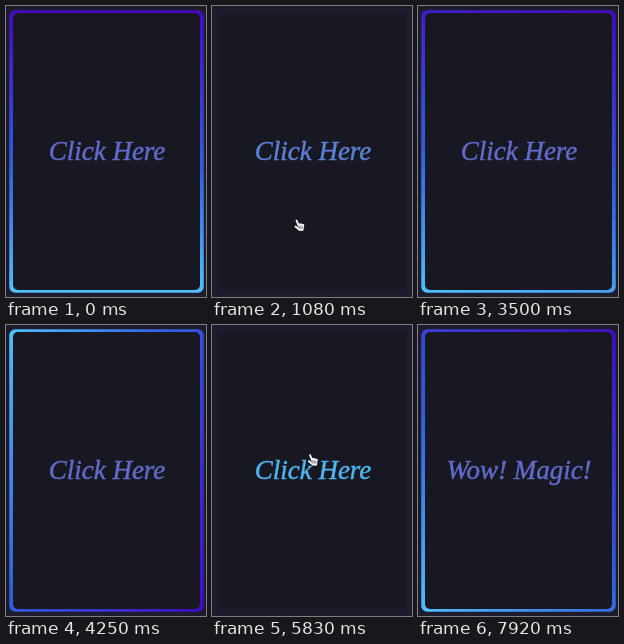
Recreate the animation shown at these times as an HTML page with a canvas. Size 200 by 291 pixels, loop 8000 ms.

```html
<!DOCTYPE html>
<html lang="en">
<head>
<meta charset="utf-8">
<title>Magic card</title>
<style>
  html, body { margin: 0; width: 100%; height: 100%; overflow: hidden; background: #1d1c2d; }
  canvas { display: block; width: 200px; height: 291px; }
</style>
</head>
<body>
<canvas id="stage"></canvas>
<script>
const W = 200, H = 291, LOOP = 8000, STEP = 1000 / 12, SPIN = 2500, SWAP = 6160;
const IDLE = [97, 107, 202], LIT = [79, 181, 242];
const canvas = document.getElementById('stage');
const ctx = canvas.getContext('2d');
const ratio = window.devicePixelRatio || 1;
canvas.width = W * ratio;
canvas.height = H * ratio;

const CARD = { x: 7, y: 7, w: 187, h: 277, r: 5 };
// The rim is 104% by 102% of the card
const RIM = { x: CARD.x - CARD.w * 0.02, y: CARD.y - CARD.h * 0.01, w: CARD.w * 1.04, h: CARD.h * 1.02, r: 6 };

const key = (t, x, y) => ({ t, x, y });
const visit = (...keys) => ({ keys, from: keys[0].t, to: keys[keys.length - 1].t });

// Times when the pointer is over the card
const VISITS = [
  visit(key(890, 93, 284), key(1083, 82, 213), key(1900, 18, 165), key(2333, 71, 79),
    key(2700, 140, 118), key(3020, 46, 150), key(3410, 200, 142)),
  visit(key(4490, 100, 284), key(5000, 92.5, 174), key(6080, 96, 125), key(6580, 92, 158),
    key(6950, 32, 184), key(7630, 198, 142))
];

function box({ x, y, w, h, r }, fill) {
  ctx.beginPath();
  ctx.roundRect(x, y, w, h, r);
  ctx.fillStyle = fill;
  ctx.fill();
}

function rimGradient(angle) {
  const s = Math.sin(angle), c = Math.cos(angle);
  const half = (Math.abs(RIM.w * s) + Math.abs(RIM.h * c)) / 2;
  const cx = RIM.x + RIM.w / 2, cy = RIM.y + RIM.h / 2;
  const g = ctx.createLinearGradient(cx - s * half, cy + c * half, cx + s * half, cy - c * half);
  g.addColorStop(0, '#50c0ff');
  g.addColorStop(0.43, '#3260e2');
  g.addColorStop(1, '#440ac0');
  return g;
}

// CSS "ease", solved by bisection
function ease(x) {
  let lo = 0, hi = 1;
  for (let i = 0; i < 20; i++) {
    const u = (lo + hi) / 2;
    if (0.75 * u * (1 - u) + u ** 3 < x) lo = u; else hi = u;
  }
  return 0.3 * lo * (1 - lo) ** 2 + 3 * lo * lo * (1 - lo) + lo ** 3;
}

// Smooth curve through the keys of a visit
function along(keys, t) {
  const i = keys.findLastIndex(k => k.t <= t);
  const a = keys[i], b = keys[i + 1], span = b.t - a.t, u = (t - a.t) / span;
  const slope = (j, axis) => {
    const p = keys[Math.max(j - 1, 0)], q = keys[Math.min(j + 1, keys.length - 1)];
    return (q[axis] - p[axis]) / (q.t - p.t) * span;
  };
  return ['x', 'y'].map(axis =>
    a[axis] + (b[axis] - a[axis]) * u * u * (3 - 2 * u) +
    slope(i, axis) * u * (1 - u) ** 2 + slope(i + 1, axis) * u * u * (u - 1));
}

function line(x1, y1, x2, y2) {
  ctx.moveTo(x1, y1);
  ctx.lineTo(x2, y2);
}

function drawHand(x, y) {
  ctx.save();
  ctx.translate(x, y);
  ctx.lineCap = 'round';
  ctx.beginPath();
  line(2.6, 1.6, 5, 7.5);
  line(1.5, 7.6, 5, 10.6);
  for (let i = 0; i < 3; i++) line(5.9 + i * 1.7, 5.2 + i * 0.4, 5.6 + i * 1.5, 11);
  for (const [width, color] of [[3, '#101018'], [2, '#f2f2f5']]) {
    ctx.lineWidth = width;
    ctx.strokeStyle = color;
    ctx.stroke();
  }
  ctx.beginPath();
  for (let i = 0; i < 3; i++) line(5.2 + i * 1.6, 7 + i * 0.3, 5.4 + i * 1.5, 9.5);
  ctx.lineWidth = 0.6;
  ctx.strokeStyle = '#3c3c48';
  ctx.stroke();
  ctx.restore();
}

function drawLabel(text, glow) {
  const rgb = IDLE.map((v, i) => Math.round(v + (LIT[i] - v) * glow));
  ctx.font = 'italic 27px "Liberation Serif", serif';
  ctx.textAlign = 'center';
  ctx.fillStyle = ctx.strokeStyle = `rgb(${rgb})`;
  ctx.lineWidth = 0.45;
  ctx.fillText(text, 101, 154);
  ctx.strokeText(text, 101, 154);
}

function draw(t) {
  const hover = VISITS.find(v => t >= v.from && t < v.to);
  const spinStart = Math.max(0, ...VISITS.map(v => v.to).filter(end => end <= t));
  ctx.setTransform(ratio, 0, 0, ratio, 0, 0);
  ctx.fillStyle = '#1d1c2d';
  ctx.fillRect(0, 0, W, H);
  if (!hover) box(RIM, rimGradient((t - spinStart) / SPIN * 2 * Math.PI));
  box(CARD, '#181822');
  drawLabel(t < SWAP ? 'Click Here' : 'Wow! Magic!', hover ? ease((t - hover.from) / 1000) : 0);
  if (hover) drawHand(...along(hover.keys, t));
}

const start = performance.now();
function tick() {
  const t = (performance.now() - start) % LOOP;
  draw(Math.min(Math.floor((t + 5) / STEP), 95) * STEP);
  requestAnimationFrame(tick);
}
tick();
</script>
</body>
</html>
```
